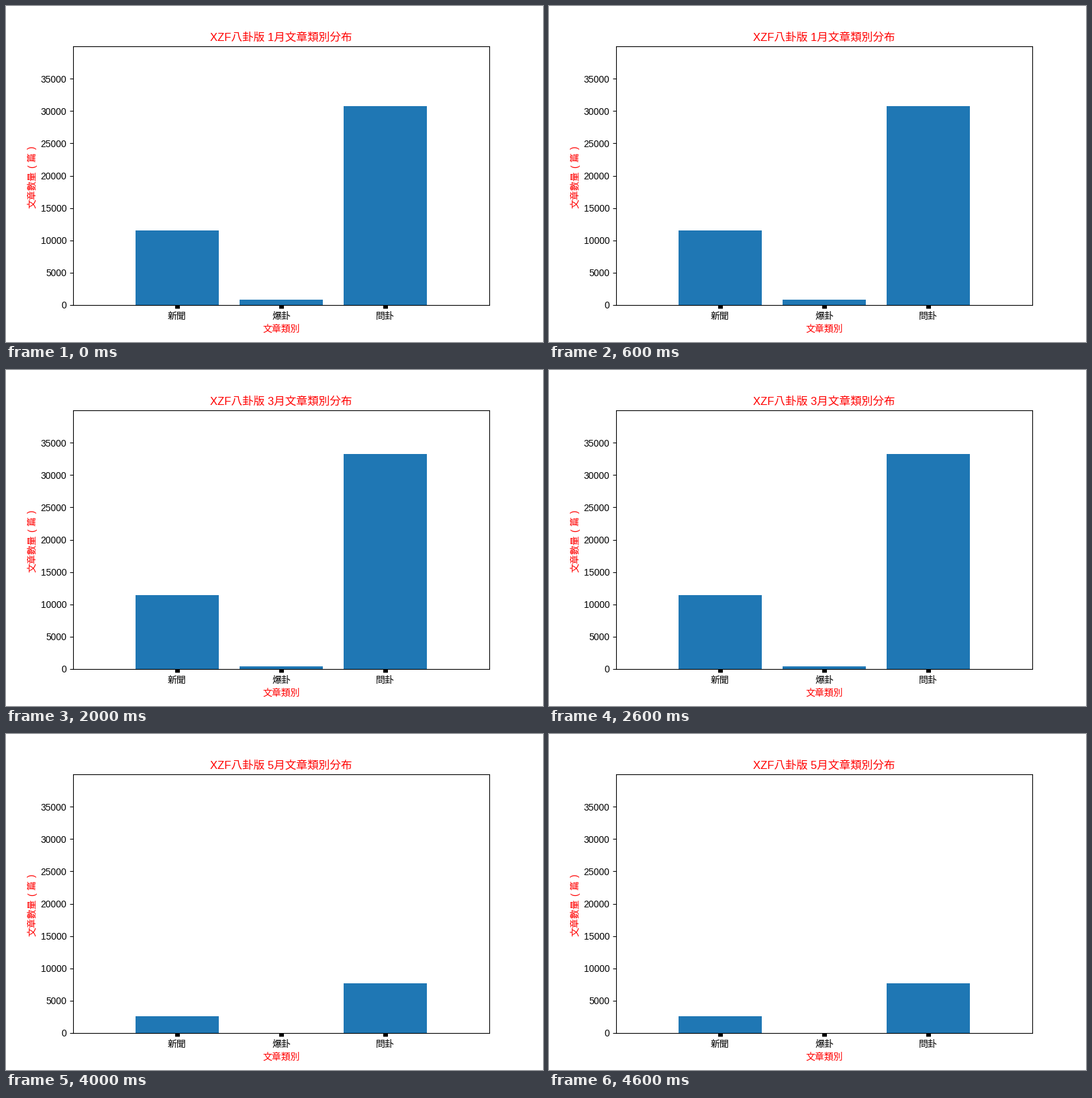
A matplotlib script that plays this animation: 800 by 500 pixels, repeating every 5000 ms.

```python
import matplotlib.pyplot as plt
from matplotlib.animation import FuncAnimation

plt.rcParams["font.family"] = ["Liberation Sans", "Noto Sans CJK JP"]

W, H, DPI = 800, 500, 100
KINDS = ["新聞", "爆卦", "問卦"]
MONTHLY = [
    (11500, 830, 30750),
    (9750, 500, 29950),
    (11430, 400, 33250),
    (10700, 1050, 37730),
    (2590, 30, 7690),
]

fig = plt.figure(figsize=(W / DPI, H / DPI), dpi=DPI, facecolor="white")
ax = fig.add_axes([0.125, 0.11, 0.775, 0.77])
ax.set_xlim(-1, 3)
ax.set_ylim(0, 40000)
ax.set_yticks(range(0, 40000, 5000))
ax.set_xticks(range(len(KINDS)), [""] * len(KINDS))
ax.tick_params(axis="x", width=5)


def label(x, y, text, size=10, color="red", rotation=0):
    """Text centred on x with its baseline at y, in pixels from the top left."""
    return fig.text(x / W, 1 - y / H, text, size=size, color=color,
                    rotation=rotation, rotation_mode="anchor",
                    ha="center", va="baseline")


title = label(410, 51.5, "", size=12)
label(410, 485, "文章類別")
for i, kind in enumerate(KINDS):
    label(255 + 155 * i, 466, kind, color="black")

# The brackets sit centred in full-width cells.
for y, part in [(273.3, "文章數量"), (238.5, "("), (224.7, "篇"), (210.8, ")")]:
    label(43, y, part, rotation=90)

bars = ax.bar(range(len(KINDS)), MONTHLY[0], width=0.8, color="#1f77b4")


def update(i):
    title.set_text(f"XZF八卦版 {i + 1}月文章類別分布")
    for bar, count in zip(bars, MONTHLY[i]):
        bar.set_height(count)
    return [title, *bars]


anim = FuncAnimation(fig, update, frames=len(MONTHLY), interval=1000,
                     repeat=True, repeat_delay=0)
plt.show()
```
